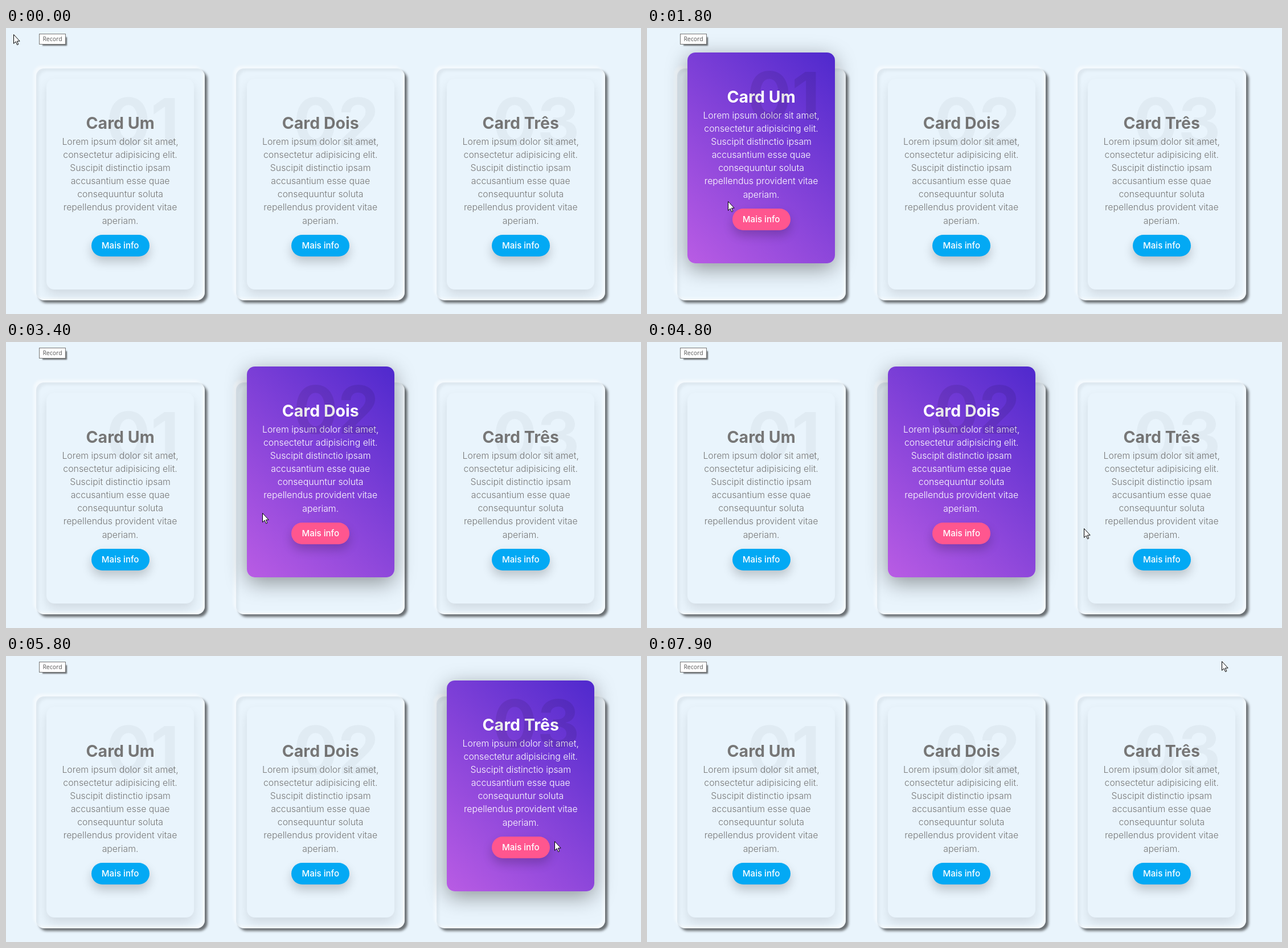
An HTML page for the animation above (8 s loop, 1115 by 502 pixels).

```html
<!DOCTYPE html>
<html lang="pt">
<head>
<meta charset="utf-8">
<title>Cards</title>
<style>
  html, body { margin: 0; width: 100%; height: 100%; overflow: hidden; background: #e9f4fc; }
  body { position: relative; font-family: Inter, "Open Sans", sans-serif; font-optical-sizing: none; }
  .tip {
    position: absolute; left: 58px; top: 10px; width: 45px; height: 17px;
    border: 1px solid #767676; background: #fff; color: #575757;
    box-shadow: 4px 4px 2px -2px rgba(0,0,0,.55);
    font: 10.5px/17px "Open Sans", "Noto Sans", sans-serif; text-align: center;
  }
  .card {
    position: absolute; top: 71px; width: 296px; height: 407px; border-radius: 14px;
    box-shadow: inset 4.6px 4.6px 4.6px rgba(0,0,0,.05), inset -4.6px -4.6px 4.6px rgba(255,255,255,.5),
      4.6px 4.6px 4.6px rgba(0,0,0,.55), -4.6px -4.6px 4.6px rgba(255,255,255,.5);
  }
  .box {
    position: absolute; left: 18.3px; top: 18.3px; width: 259px; height: 370px;
    border-radius: 14px; background: #e9f4fc; text-align: center; white-space: nowrap;
  }
  .box > * { position: absolute; margin: 0; }
  .box.on { background: linear-gradient(45deg, #b95ce4, #4f29cd); }
  h2 { right: 26px; top: 6px; font-size: 116px; line-height: 140px; font-weight: 700; }
  h3 { left: 0; width: 100%; top: 57.7px; font-size: 28.5px; line-height: 40px; font-weight: 700; }
  p { left: 0; width: 100%; top: 98.5px; font-size: 15.85px; line-height: 23.13px; font-weight: 350; }
  .btn {
    left: 78.5px; top: 273.7px; width: 102px; height: 38px; border-radius: 19px;
    background: #03a9f4; color: #fff; font-size: 15.1px; line-height: 38px; font-weight: 500;
    box-shadow: 0 9.25px 18.5px rgba(0,0,0,.2);
  }
  .on .btn { background: #ff568f; }
  #cursor { position: absolute; left: 0; top: 0; width: 13px; height: 21px; }
</style>
</head>
<body>
<div class="tip">Record</div>
<svg id="cursor" viewBox="0 0 13 21">
  <path d="M.5 .5V16.3L4.1 12.9L6.6 18.6L8.8 17.7L6.4 12.1H11.2Z" fill="#fff" stroke="#000"/>
</svg>
<script>
const LOOP = 8000, STEP = 100, LIFT = 46.25, LAG = 75;
const text = ['Lorem ipsum dolor sit amet,', 'consectetur adipisicing elit.', 'Suscipit distinctio ipsam',
  'accusantium esse quae', 'consequuntur soluta', 'repellendus provident vitae', 'aperiam.'].join('<br>');

// at each turn the pointer leaves one card and, LAG later, enters the next
const turns = [
  { at: 1425, fade: 300 }, { at: 3125, fade: 200 }, { at: 4975, fade: 500 }, { at: 6450, fade: 500 }
];

// pointer glides: from, until, x, y
const home = [13, 11];
const glides = [
  [0, 100, 13, 63], [800, 1000, 6, 105], [1100, 1800, 142, 304], [3000, 3100, 333, 281],
  [3100, 3400, 450, 300], [3900, 4800, 767, 327], [4900, 5800, 963, 325],
  [5900, 6500, 1089, 301], [7100, 7200, 1099, 299], [7500, 7600, 1089, 95], [7600, 7900, 1009, 9]
];
const away = t => t >= 7300 && t < 7600;

const cursor = document.getElementById('cursor');
const mix = (a, b, k) => a + (b - a) * k;
const clamp = v => Math.min(1, Math.max(0, v));

// CSS "ease": cubic-bezier(.25, .1, .25, 1)
function ease(x) {
  if (x <= 0 || x >= 1) return clamp(x);
  const bez = (a, b, s) => 3 * a * s * (1 - s) ** 2 + 3 * b * s * s * (1 - s) + s ** 3;
  let lo = 0, hi = 1;
  for (let i = 0; i < 24; i++) {
    const mid = (lo + hi) / 2;
    if (bez(.25, .25, mid) < x) lo = mid; else hi = mid;
  }
  return bez(.1, 1, lo);
}

const cards = ['Um', 'Dois', 'Três'].map((name, i) => {
  const el = document.createElement('div');
  el.className = 'card';
  el.style.left = 52.8 + i * 351.6 + 'px';
  el.innerHTML = `<div class="box"><h3>Card ${name}</h3><p>${text}</p>
    <div class="btn">Mais info</div><h2>0${i + 1}</h2></div>`;
  document.body.insertBefore(el, cursor);
  return { box: el.firstChild, digits: el.querySelector('h2'), enter: turns[i], leave: turns[i + 1] };
});

function drawCard({ box, digits, enter, leave }, t) {
  const on = enter.at + LAG, off = leave.at;
  const k = t < off ? ease((t - on) / enter.fade) : 1 - ease((t - off) / leave.fade);
  const tone = Math.round(mix(119, 255, k));
  box.classList.toggle('on', t >= on && t < off);
  box.style.transform = `translateY(${Math.round(-LIFT * k)}px)`;
  box.style.color = `rgb(${tone},${tone},${tone})`;
  box.style.boxShadow = `0 9.25px ${mix(18.5, 37, k)}px rgba(0,0,0,${mix(.1, .4, k)})`;
  digits.style.color = `rgba(0,0,0,${mix(.035, .09, k)})`;
}

function drawCursor(t) {
  let [x, y] = home;
  for (const [from, until, toX, toY] of glides) {
    const k = clamp((t - from) / (until - from));
    x = mix(x, toX, k);
    y = mix(y, toY, k);
  }
  cursor.style.transform = `translate(${Math.round(x)}px,${Math.round(y)}px)`;
  cursor.style.visibility = away(t) ? 'hidden' : 'visible';
}

function draw(t) {
  cards.forEach(c => drawCard(c, t));
  drawCursor(t);
}

const start = performance.now();
function tick() {
  const t = (performance.now() - start) % LOOP;
  draw(Math.floor(t / STEP) * STEP);
  requestAnimationFrame(tick);
}
draw(0);
requestAnimationFrame(tick);
</script>
</body>
</html>
```
